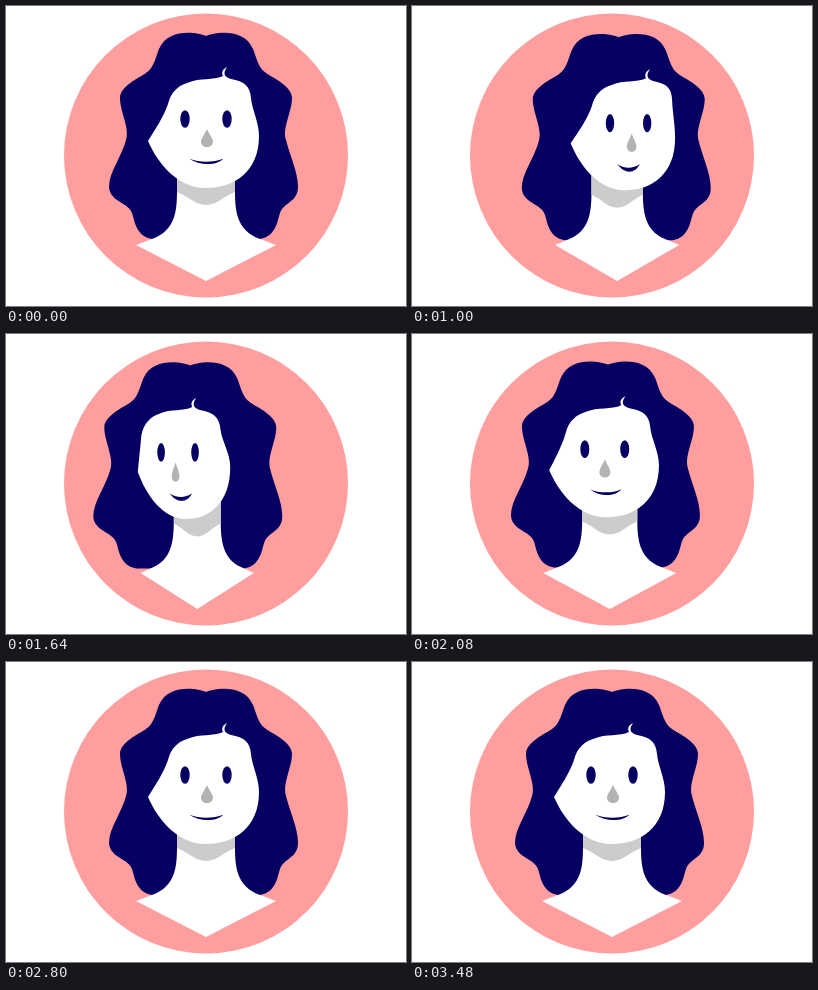
Animation of 400x300 px, one loop 3.8 s. Source, as an HTML page:

```html
<!DOCTYPE html>
<html lang="en">
<head>
<meta charset="utf-8">
<title>Portrait</title>
<style>
html, body { margin: 0; width: 100%; height: 100%; overflow: hidden; background: #fff; }
svg { display: block; width: 400px; height: 300px; }
</style>
</head>
<body>
<svg viewBox="0 0 400 300">
  <circle cx="200" cy="149.5" r="142" fill="#ff9e9e"/>
  <path id="hair" fill="#050062"/>
  <path id="body" fill="#fff"/>
  <path id="shade" fill="#ccc"/>
  <path id="face" fill="#fff"/>
  <path id="nose" fill="#b3b3b3"/>
  <ellipse id="eyeL" fill="#050062"/>
  <ellipse id="eyeR" fill="#050062"/>
  <path id="mouth" fill="#050062"/>
</svg>
<script>
const LOOP = 3800, STEP = 40;
const $ = id => document.getElementById(id);

// Rows: time, value, optional time warp for the segment ending there
const TURN = [[0, 0], [600, 0], [1200, 1, 1.65], [1720, -1], [2240, 0], [LOOP, 0]];
const NOD = [[0, 0], [240, .65], [480, 0], [2240, 0], [2520, 1], [2800, 0],
  [3080, 1], [3480, 0, .6], [LOOP, 0]];
const SMILE = [[0, 0], [440, 1], [1720, 1], [2240, 0], [LOOP, 0]];

// Left half of the hair, from the parting down to the shoulder
const LOCKS = [[200, 30], [190, 26], [162, 22], [153, 43], [150, 50], [148, 62], [140, 67],
  [133, 72], [114, 80], [114, 92], [114, 106], [124, 122], [120, 134],
  [116, 150], [103, 166], [103, 181], [104, 196], [122, 196], [126, 207],
  [129, 216], [130, 230], [146, 233]];
const RIGHT = LOCKS.map(([x, y]) => [400 - Math.max(x, 108), y]).reverse();
const HAIR = 'M' + LOCKS[0] + 'C' + LOCKS.slice(1).join(' ') +
  'L' + RIGHT[0] + 'C' + RIGHT.slice(1).join(' ') + 'Z';

const BODY = 'M171,160 L171,182 C171,202 171,224 146,233 L130,239 L200,275 L270,239 ' +
  'L254,233 C229,224 229,202 229,182 L229,160 Z';
const SHADE = 'M171,165 L171,186 C182,190 189,199 200,199 C211,199 218,190 229,186 L229,165 Z';
const FACE = 'M142,135 C150,122 158,110 162,98 C165,86 172,80 181,77 C195,71 207,75 217,70 ' +
  'C215,66 217,63 221,61 C216,68 219,71 225,73 C238,75 244,80 245,92 ' +
  'C246,104 253,116 253,130 C253,166 228,182 200,182 C172,182 152,158 142,135 Z';
const NOSE = 'M201,123 C203,128 207,132 207,136 C207,139 204,141 201,141 ' +
  'C198,141 195,139 195,136 C195,132 199,128 201,123 Z';

function value(keys, t) {
  const i = keys.findIndex(k => k[0] > t);
  const [t0, a] = keys[i - 1], [t1, b, warp = 1] = keys[i];
  const p = ((t - t0) / (t1 - t0)) ** warp;
  return a + (b - a) * p * p * (3 - 2 * p);
}

const bend = (d, fn) => d.replace(/([\d.]+),([\d.]+)/g,
  (_, x, y) => fn(+x, +y).map(v => v.toFixed(2)).join());

function draw(t) {
  const turn = value(TURN, t), nod = value(NOD, t), smile = value(SMILE, t);
  const side = Math.abs(turn);
  const dip = 1 - (1 - side) ** 2;
  const squash = 1 - .22 * side;
  const set = (id, d, fn) => $(id).setAttribute('d', bend(d, fn));

  const bodyX = x => 200 + 10 * turn + (x - 200) * squash;
  set('body', BODY, (x, y) => [bodyX(x), y]);
  set('shade', SHADE, (x, y) => [bodyX(x), y + 3.5 * dip + 8 * nod]);

  const hairX = turn * (turn < 0 ? 18 : 13);
  set('hair', HAIR, (x, y) => {
    const end = Math.max(0, (y - 207) / 26);
    return [
      x + hairX + Math.sign(x - 200) * 14 * nod * end,
      y + 1.5 * dip + nod * (14 - .035 * (y - 27) - 2 * end)
    ];
  });

  // The hairline slides further round than the jaw
  const slide = x => turn < 0
    ? 15 * Math.min(1, (x - 142) / 20) * Math.sqrt(Math.max(0, 250 - x) / 88)
    : 11 * Math.min(1, (253 - x) / 10) * Math.sqrt(Math.max(0, x - 145) / 100);
  const faceX = 197.5 + 24.5 * turn + 2.5 * turn * turn;
  set('face', FACE, (x, y) => [
    faceX + (x - 197.5) * (1 - .22 * turn * turn) + (y < 130 ? slide(x) * turn : 0),
    y + 3 * dip + nod * (13.5 - .04 * (y - 70))
  ]);

  const down = 5.4 * dip + 14.3 * nod;
  const midX = 200 + 32 * turn;
  [['eyeL', -21], ['eyeR', 21]].forEach(([id, dx]) => {
    const eye = $(id);
    eye.setAttribute('cx', midX + dx * squash);
    eye.setAttribute('cy', 113 + down);
    eye.setAttribute('rx', 4.7 * squash);
    eye.setAttribute('ry', 8.8 + .6 * side);
  });
  set('nose', NOSE, (x, y) => [
    201 + 36 * turn + (x - 201) * (1 - .4 * side),
    123 + (y - 123) * (1 + .08 * side) + down
  ]);

  const half = 17 - 5.8 * smile, cx = 200.3 + 30 * turn + .7 * smile;
  const y = 152.7 + 1.2 * smile + down;
  const top = y + 5 + smile, low = y + 7.2 + 3 * smile;
  $('mouth').setAttribute('d', `M${cx - half},${y}` +
    `C${cx - half * .4},${top - 1} ${cx + half * .4},${top - 1} ${cx + half},${y}` +
    `C${cx + half * .6},${low} ${cx - half * .4},${low} ${cx - half},${y}Z`);
}

const start = performance.now();
function tick(now) {
  const t = Math.max(0, now - start) % LOOP;
  draw(Math.floor(t / STEP) * STEP);
  requestAnimationFrame(tick);
}
draw(0);
requestAnimationFrame(tick);
</script>
</body>
</html>
```
